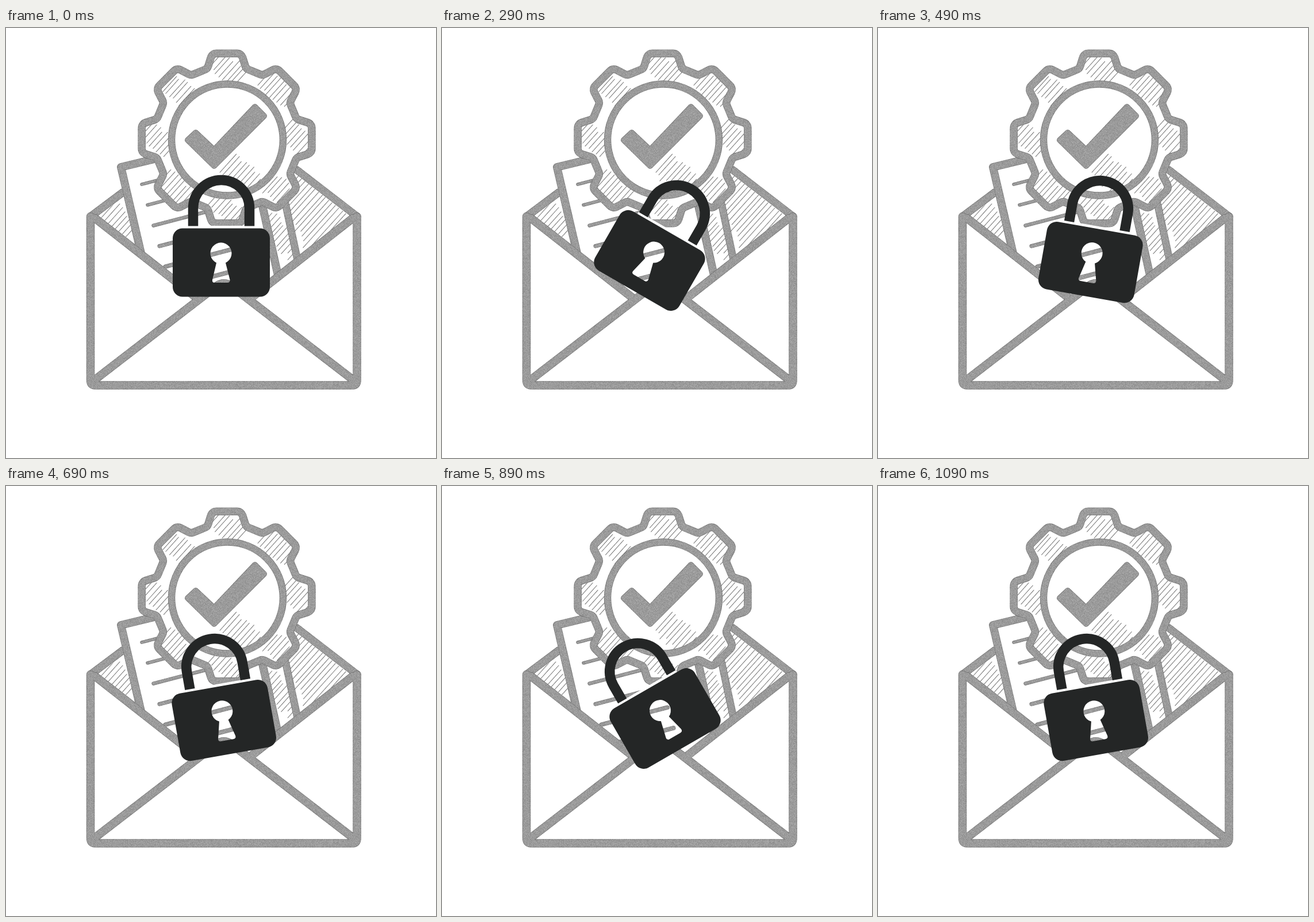
Recreate the animation shown at these times as an HTML page with a canvas. Size 748x748 px, loop 1.19 s.

```html
<!DOCTYPE html>
<html lang="en">
<head>
<meta charset="utf-8">
<title>Secure mail</title>
<style>
html, body { margin: 0; width: 100%; height: 100%; overflow: hidden; background: #fff; }
canvas { display: block; }
</style>
</head>
<body>
<canvas id="stage" width="748" height="748"></canvas>
<script>
const SIZE = 748, GRAY = '#9b9b9b', EDGE = '#7c7c7c', INK = '#242626';
const RAD = Math.PI / 180;
const GEAR = { x: 384, y: 192, teeth: 8, tip: 150, root: 126 };
const stage = document.getElementById('stage').getContext('2d');
const scene = document.createElement('canvas');
scene.width = scene.height = SIZE;
const art = scene.getContext('2d', { willReadFrequently: true });
art.lineJoin = art.lineCap = 'round';

let seed = 7;
const rand = () => (seed = (seed * 16807) % 2147483647) / 2147483647;

// Gray band with a thin darker rim
function band(path, width) {
  art.strokeStyle = EDGE;
  art.lineWidth = width;
  art.stroke(path);
  art.strokeStyle = GRAY;
  art.lineWidth = width - 1.8;
  art.stroke(path);
}

function fill(path, color = '#fff') {
  art.fillStyle = color;
  art.fill(path);
}

// Patch of loose pen strokes around (cx, cy), rising to the right
function hatch(cx, cy, count, length, tilt = 48) {
  const ux = Math.cos(tilt * RAD), uy = -Math.sin(tilt * RAD);
  art.strokeStyle = '#808080';
  art.lineWidth = 1.1;
  art.beginPath();
  for (let i = 0; i < count; i++) {
    const across = (i - (count - 1) / 2) * 7.5 + rand() * 2;
    const from = -length * (0.3 + rand() * 0.2), to = length * (0.3 + rand() * 0.2);
    const x = cx - uy * across, y = cy + ux * across;
    art.moveTo(x + ux * from, y + uy * from);
    art.lineTo(x + ux * to, y + uy * to);
  }
  art.stroke();
}

function clipped(path, draw) {
  art.save();
  art.clip(path, 'evenodd');
  draw();
  art.restore();
}

function polar(radius, degrees) {
  return [GEAR.x + radius * Math.sin(degrees * RAD), GEAR.y - radius * Math.cos(degrees * RAD)];
}

function roundedLoop(points, radius) {
  const path = new Path2D(), n = points.length;
  const [ax, ay] = points[0], [bx, by] = points[n - 1];
  path.moveTo((ax + bx) / 2, (ay + by) / 2);
  points.forEach(([x, y], i) => path.arcTo(x, y, ...points[(i + 1) % n], radius));
  path.closePath();
  return path;
}

function drawBackFlap() {
  clipped(new Path2D('M160 327L205 294L228 378Z'), () => hatch(192, 334, 9, 55));
  clipped(new Path2D('M505 254L598 328L512 396L488 305Z'), () => hatch(540, 322, 19, 125));
  band(new Path2D('M203 286L147 328M506 247L611 328'), 13.5);
}

function drawPapers() {
  fill(new Path2D('M425 300H485L512 400L470 440Z'));
  clipped(new Path2D('M452 310H484L505 400L476 425Z'), () => hatch(477, 360, 15, 48));
  band(new Path2D('M486 305L507 403'), 13);
  const sheet = new Path2D('M235 392L200 242L262 227M444 300L474 434');
  fill(new Path2D('M235 392L200 242L262 227L444 300L474 434L380 480Z'));
  band(sheet, 14);
  for (let i = 0; i < 6; i++) {
    const x = 236 + 10.3 * i, y = 272 + 35.8 * i;
    band(new Path2D(`M${x} ${y}l115 -30`), 5.5 + i / 2);
  }
}

function drawGear() {
  const corners = [], pitch = 360 / GEAR.teeth;
  for (let i = 0; i < GEAR.teeth; i++) {
    const a = i * pitch;
    corners.push(polar(GEAR.root, a - 15.5), polar(GEAR.tip, a - 9.7),
      polar(GEAR.tip, a + 9.7), polar(GEAR.root, a + 15.5));
  }
  const gear = roundedLoop(corners, 10);
  const ring = new Path2D();
  ring.arc(385, 194.5, 97, 0, 7);
  fill(gear);

  const rim = new Path2D(gear);
  rim.addPath(ring);
  clipped(rim, () => {
    for (let i = 0; i < GEAR.teeth; i++) hatch(...polar(124, i * pitch), 9, 46);
  });
  clipped(ring, () => hatch(412, 261, 11, 56));
  band(ring, 12.5);
  band(gear, 13.5);

  const check = new Path2D('M316 195L330 182L362 212L433 137L449 153L362 240Z');
  band(check, 10);
  fill(check, GRAY);
}

function drawEnvelope() {
  fill(new Path2D('M147 330L331 468L366 450Q379 440 392 450L428 468L611 330V622H147Z'));
  const lines = new Path2D('M155 331L331 469M603 331L427 469');
  lines.addPath(new Path2D('M157 610L366 449Q379 440 392 449L601 610'));
  lines.addPath(new Path2D('M147 328V613Q147 621.5 155 621.5H603Q610.5 621.5 610.5 613V328'));
  band(lines, 14.5);
}

// Pencil grain on the gray parts only
function addGrain() {
  const image = art.getImageData(0, 0, SIZE, SIZE), d = image.data;
  for (let i = 0; i < d.length; i += 4) {
    if (d[i] > 175) continue;
    d[i] = d[i + 1] = d[i + 2] = d[i] + (rand() - 0.5) * 32;
  }
  art.putImageData(image, 0, 0);
}

art.fillStyle = '#fff';
art.fillRect(0, 0, SIZE, SIZE);
drawBackFlap();
drawPapers();
drawGear();
drawEnvelope();
addGrain();

const PIVOT = [374.5, 381];
const shackle = new Path2D('M325.5 344.5V313.5A49 49 0 0 1 423.5 313.5V344.5');
const body = new Path2D();
body.roundRect(290, 348.5, 169, 119, 17);
body.addPath(new Path2D('M366 408.5A18.5 18.5 0 1 1 382 408.5L389.5 438Q390 443 385 443H363Q358 443 359 438Z'));

function drawLock(angle) {
  stage.save();
  stage.translate(...PIVOT);
  stage.rotate(angle);
  stage.translate(-PIVOT[0], -PIVOT[1]);
  stage.fillStyle = '#fff';
  stage.fillRect(316, 344, 117, 5);
  stage.strokeStyle = stage.fillStyle = INK;
  stage.lineWidth = 17.5;
  stage.stroke(shackle);
  stage.fill(body, 'evenodd');
  stage.restore();
}

// Twelve held poses, swinging 30 degrees to each side in steps of 10
function frame() {
  const t = performance.now() % 1190;
  const step = t < 100 ? 0 : Math.floor((t + 10) / 100);
  stage.drawImage(scene, 0, 0);
  drawLock(Math.asin(Math.sin(step * Math.PI / 6)) / 3);
  requestAnimationFrame(frame);
}
frame();
</script>
</body>
</html>
```
